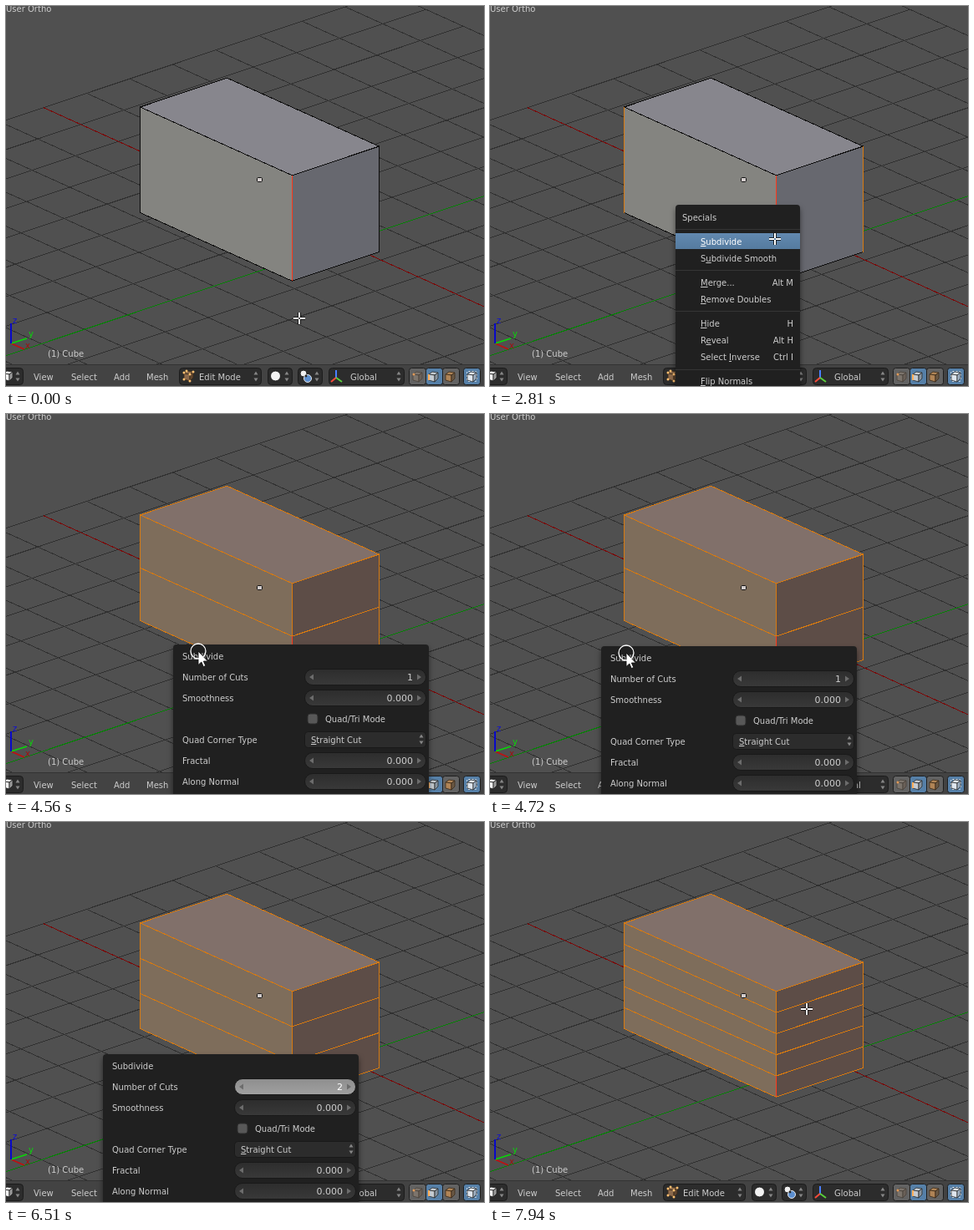
Animation of 572x455 px, one loop 8000 ms. Source, as an HTML page:

```html
<!DOCTYPE html>
<html lang="en">
<head>
<meta charset="utf-8">
<title>Subdivide edges</title>
<style>
html, body { margin: 0; width: 100%; height: 100%; overflow: hidden; background: #505050; }
svg { display: block; width: 572px; height: 455px; }
text { font: 10px "DejaVu Sans", Verdana, sans-serif; fill: #cdcdcd; white-space: pre; }
.num { font-size: 11px; text-anchor: end; }
.end { text-anchor: end; }
.crisp { shape-rendering: crispEdges; }
.u { text-decoration: underline; }
.pop { filter: drop-shadow(0 4px 3px rgba(0, 0, 0, .5)); }
</style>
</head>
<body>
<svg id="stage" viewBox="0 0 572 455"></svg>
<script>
const LOOP = 8000;
const range = (a, b) => Array.from({ length: b - a + 1 }, (_, i) => a + i);
const line = (pts, color, w = 1) =>
  `<path d="M${pts.join('L')}" fill="none" stroke="${color}" stroke-width="${w}"/>`;
const poly = (pts, fill, extra = '') => `<path d="M${pts.join('L')}Z" fill="${fill}" ${extra}/>`;
const box = (x, y, w, h, r, fill, extra = '') =>
  `<rect x="${x}" y="${y}" width="${w}" height="${h}" rx="${r}" fill="${fill}" ${extra}/>`;
const dot = (x, y, r, fill, extra = '') => `<circle cx="${x}" cy="${y}" r="${r}" fill="${fill}" ${extra}/>`;
const text = (x, y, s, extra = '') => `<text x="${x}" y="${y + 4}" ${extra}>${s}</text>`;
const hot = s => s.replace(/_(.)/, '<tspan class="u">$1</tspan>');

// Floor grid
const at = (u, v) => [403.6 + u * 44.85 + v * 51.6, 283.8 + u * 20.27 - v * 17.23];
const rowU = (u, c) => line([at(u, -8), at(u, 8)], c);
const rowV = (v, c) => line([at(-8, v), at(8, v)], c);
const steps = range(-8, 8).filter(i => i);
const grid = steps.map(i => rowU(i, '#303030') + rowV(i, '#303030')).join('') +
  rowV(0, '#7c0505') + rowU(0, '#078007');

// Box: left, back, right and front corners of the top face
const H = 126.5;
const A = [160.5, 121], B = [264.5, 86.2], C = [446.5, 168], D = [342.5, 202.8];
const down = (p, f) => [p[0], p[1] + H * f];
const ORANGE = '#d87a10', RED = '#ff3a1c';
const LOOKS = {
  plain: ['#848480', '#87868d', '#67686f', '#0c0c0c'],
  picked: ['#7e6d5b', '#81706a', '#5d4d47', ORANGE]
};

function cube(cuts, ring) {
  const [left, top, right, wire] = cuts ? LOOKS.picked : LOOKS.plain;
  let s = poly([A, D, down(D, 1), down(A, 1)], left) +
    poly([A, B, C, D], top) +
    poly([D, C, down(C, 1), down(D, 1)], right) +
    line([A, B, C, D, A, down(A, 1), down(D, 1), down(C, 1), C], wire) +
    line([D, down(D, 1)], wire);
  for (let k = 1; k <= cuts; k++) {
    const f = k / (cuts + 1);
    s += line([down(A, f), down(D, f), down(C, f)], ORANGE);
  }
  if (ring) s += [A, C].map(p => line([p, down(p, 1)], ORANGE)).join('');
  s += line([down(D, cuts / (cuts + 1)), down(D, 1)], RED);
  return s;
}

const center = box(300.5, 205.5, 6, 5, 1.2, '#d2cccb', 'stroke="#111"');

const gizmo = line([[6, 404], [22, 411]], '#c01010', 1.6) +
  line([[6, 404], [25, 398]], '#08d808', 1.6) +
  line([[6, 404], [6, 380]], '#0808c8', 2) +
  text(8, 376, 'z', 'style="fill:#1010d0"') +
  text(27, 392, 'y', 'style="fill:#08d808"') +
  text(23, 406, 'x', 'style="fill:#a01010"');

// Header bar
const arrows = (x, y, c = '#868686') =>
  poly([[x - 2.5, y - 2], [x, y - 6], [x + 2.5, y - 2]], c) +
  poly([[x - 2.5, y + 2], [x, y + 6], [x + 2.5, y + 2]], c);
const drop = (x, w) => box(x + .5, 433.5, w, 20, 4, '#2c2c2c', 'stroke="#1c1c1c"') + arrows(x + w - 6, 443.5);
const tab = (x, on) => box(x + .5, 433.5, 20, 20, 3, on ? '#5680a8' : '#636363', 'stroke="#1e1e1e"');
const block = (x, y, c, side, edge = '#3a2a18') => {
  const o = `stroke="${edge}" stroke-width=".8"`;
  return poly([[x - 5, y - 3], [x - 1, y - 6], [x + 6, y - 5], [x + 2, y - 2]], c, o) +
    poly([[x - 5, y - 3], [x + 2, y - 2], [x + 2, y + 6], [x - 5, y + 4]], c, o) +
    poly([[x + 2, y - 2], [x + 6, y - 5], [x + 6, y + 2], [x + 2, y + 6]], side, o);
};
const header = box(0, 430, 572, 25, 0, '#434343') + box(0, 429, 572, 1, 0, '#333') +
  drop(-20, 40) + block(2, 443, '#f0f0f0', '#9a9a9a', '#222') +
  [[33, 'View'], [78, 'Select'], [129, 'Add'], [168, 'Mesh']].map(([x, s]) => text(x, 444, s)).join('') +
  drop(207, 98) + block(218, 443, '#8c6a4c', '#604630') +
  [[213, 439], [220, 441], [213, 447], [220, 449], [224, 438], [216, 437]]
    .map(p => dot(...p, 1.5, '#ffc070')).join('') +
  text(231, 444, 'Edit Mode') +
  drop(313, 29) + dot(322.5, 443, 6, '#f2f2f2', 'stroke="#222"') +
  drop(349, 29) + dot(356, 440, 4, '#f0f0f0', 'stroke="#222"') +
  dot(361, 446, 4.5, '#5c8fd0', 'stroke="#e8e8e8"') + dot(359, 443, 1.4, '#222') +
  drop(386, 90) + line([[395, 445], [395, 436]], '#4a80ff', 2) +
  line([[395, 445], [389, 450]], '#ff4a3a', 2) + line([[395, 445], [402, 450]], '#5ad03a', 2) +
  text(412, 444, 'Global') +
  tab(482) + tab(502, true) + tab(522) +
  block(492, 444, '#7c746c', '#6a6058', '#4a423a') + dot(488, 441, 1.5, '#e09a58') +
  block(511, 444, '#c4cad0', '#8894a0', '#2a2a2a') + line([[506, 441], [506, 448]], '#ffb05a', 2) +
  block(531, 444, '#b08456', '#6a5844') +
  tab(547, true) + box(551.5, 437.5, 12, 12, 2, 'none', 'stroke="#f0f0f0" stroke-dasharray="2 2"') +
  block(557, 444, '#dfe6ee', '#9fb0c2', '#333');

// Specials menu
const ITEMS = [
  [282, '_Subdivide'], [302, 'S_ubdivide Smooth'], [331, '_Merge...', 'Alt M'], [351, '_Remove Doubles'],
  [380, '_Hide', 'H'], [400, 'R_eveal', 'Alt H'], [420, 'Select _Inverse', 'Ctrl I'], [449, '_Flip Normals']
];
const menu = `<g class="pop">${box(222, 238, 149, 240, 4, '#202020')}</g>` +
  text(230, 253, 'Specials') +
  [267, 316, 365, 435].map(y => box(222, y, 149, 1, 0, '#353535')).join('') +
  box(222, 272, 149, 19, 0, 'url(#blue)') +
  ITEMS.map(([y, s, key], i) => text(252, y, hot(s), i ? '' : 'style="fill:#fff"') +
    (key ? text(363, y, key, 'class="end"') : '')).join('');

// Operator panel, in its own coordinates
const tri = (x, y, d) => poly([[x + d * 3, y - 3.5], [x - d * 2, y], [x + d * 3, y + 3.5]], '#6c6c6c');
const field = (y, label, value, id = '') => text(11, y, label) +
  box(157.5, y - 9.5, 145, 19, 9.5, 'url(#slot)', `stroke="#191919" ${id && `id="${id}"`}`) +
  tri(165, y, 1) + tri(295, y, -1) +
  text(287, y, value, `class="num" ${id && `id="${id}Text"`}`);
const panel = `<g class="pop">${box(0, 0, 306, 220, 4, '#202020')}</g>` +
  text(11, 14, 'Subdivide') +
  field(39, 'Number of Cuts', '1', 'cuts') + field(64, 'Smoothness', '0.000') +
  box(161, 83, 12, 12, 3, '#585858', 'stroke="#2e2e2e"') + text(182, 89, 'Quad/Tri Mode') +
  text(11, 114, 'Quad Corner Type') + box(157.5, 104.5, 145, 19, 4, '#2c2c2c', 'stroke="#191919"') +
  text(165, 114, hot('_Straight Cut')) + arrows(297, 113.5) +
  field(139, 'Fractal', '0.000') + field(164, 'Along Normal', '0.000') + field(189, 'Random Seed', '0');

// Pointer shapes
const arms = 'M-7 0H-1M1 0H7M0 -7V-1M0 1V7';
const cursor = `<g id="cross" transform="translate(1 0)">
  <path d="${arms}" stroke="#111" stroke-width="4" stroke-opacity=".85"/>
  <path d="${arms}" stroke="#fff" stroke-width="2"/></g>
  <path id="arrow" d="M0 0V16.5L3.8 13L6.3 18.6L8.8 17.5L6.4 12H11.5Z" fill="#fff" stroke="#111" stroke-width=".9"/>
  <circle id="ring" r="9" fill="none" stroke="#fff" stroke-width="1.3"/>`;

const fade = (id, a, b) => `<linearGradient id="${id}" x2="0" y2="1"><stop stop-color="${a}"/>
  <stop offset="1" stop-color="${b}"/></linearGradient>`;
const $ = id => document.getElementById(id);
$('stage').innerHTML = `<defs>${fade('blue', '#6289b0', '#557b9f')}${fade('slot', '#2d2d2d', '#393939')}
  ${fade('over', '#404040', '#4c4c4c')}${fade('press', '#8e8e8e', '#a0a0a0')}</defs>
  ${box(0, 0, 572, 455, 0, '#505050')}<g class="crisp">${grid}</g><g id="cube" class="crisp"></g>
  ${center}${gizmo}${text(0, 3, 'User Ortho')}${text(50, 416, '(1) Cube')}${header}
  <g id="menu">${menu}</g><g id="panel">${panel}</g><g id="cursor">${cursor}</g>`;

// Pointer path: time, x, y
const PATH = [
  [0, 350, 374], [60, 350, 374], [300, 343, 345], [520, 336, 306], [700, 338, 286], [820, 342, 281],
  [2300, 342, 281], [2360, 340, 279], [3140, 340, 279], [3200, 350, 269], [4130, 350, 269],
  [4250, 375, 274], [4400, 325, 279], [4560, 230, 284], [4720, 163, 286], [4770, 163, 286], [4780, 146, 286],
  [4890, 225, 296], [4950, 225, 296], [5140, 320, 306], [5360, 407, 313],
  [7320, 407, 313], [7420, 460, 303], [7560, 516, 285], [7740, 440, 245], [7940, 378, 224], [LOOP, 378, 224]
];
const CUTS = [[0, 0], [2860, 1], [5640, 2], [6570, 3], [7010, 4]];
const PRESSED = [[5510, 5640], [6510, 6610], [6890, 7070]];
const CLICKS = [[1000, 1370], [2610, 2810], [4260, 4785]];
const MENU = [2300, 2860], PANEL = [3970, 7480], DRAG = [4250, 4780], HIDDEN = [5360, 7320];

const within = (t, [a, b]) => t >= a && t < b;
const show = (id, on) => $(id).setAttribute('visibility', on ? 'visible' : 'hidden');
const move = (id, x, y) => $(id).setAttribute('transform', `translate(${x} ${y})`);

function pointer(t) {
  const i = PATH.findIndex(k => k[0] > t);
  const [t0, x0, y0] = PATH[i - 1], [t1, x1, y1] = PATH[i];
  const f = (t - t0) / (t1 - t0);
  return [x0 + (x1 - x0) * f, y0 + (y1 - y0) * f].map(Math.round);
}

let shape = '';
function draw(t) {
  const [x, y] = pointer(t);
  const cuts = CUTS.filter(k => k[0] <= t).pop()[1];
  const ring = t >= 1060 && !cuts;
  const key = cuts + '/' + ring;
  if (key !== shape) {
    $('cube').innerHTML = cube(cuts, ring);
    $('cutsText').textContent = Math.max(1, cuts);
    shape = key;
  }

  const open = within(t, PANEL);
  show('menu', within(t, MENU));
  show('panel', open);
  if (t < DRAG[0]) move('panel', 345, 266);
  else if (t < DRAG[1]) move('panel', x - 30, y - 8);
  else move('panel', 116, 278);

  const pressed = PRESSED.some(p => within(t, p));
  const over = t > 4950 && x > 274 && x < 419;
  $('cuts').setAttribute('fill', `url(#${pressed ? 'press' : over ? 'over' : 'slot'})`);
  $('cutsText').style.fill = pressed ? '#fff' : '';

  const seen = !within(t, HIDDEN);
  move('cursor', x, y);
  show('cross', seen && !open);
  show('arrow', seen && open);
  show('ring', CLICKS.some(c => within(t, c)));
}

const start = performance.now();
function tick() {
  draw((performance.now() - start) % LOOP);
  requestAnimationFrame(tick);
}
tick();
</script>
</body>
</html>
```
